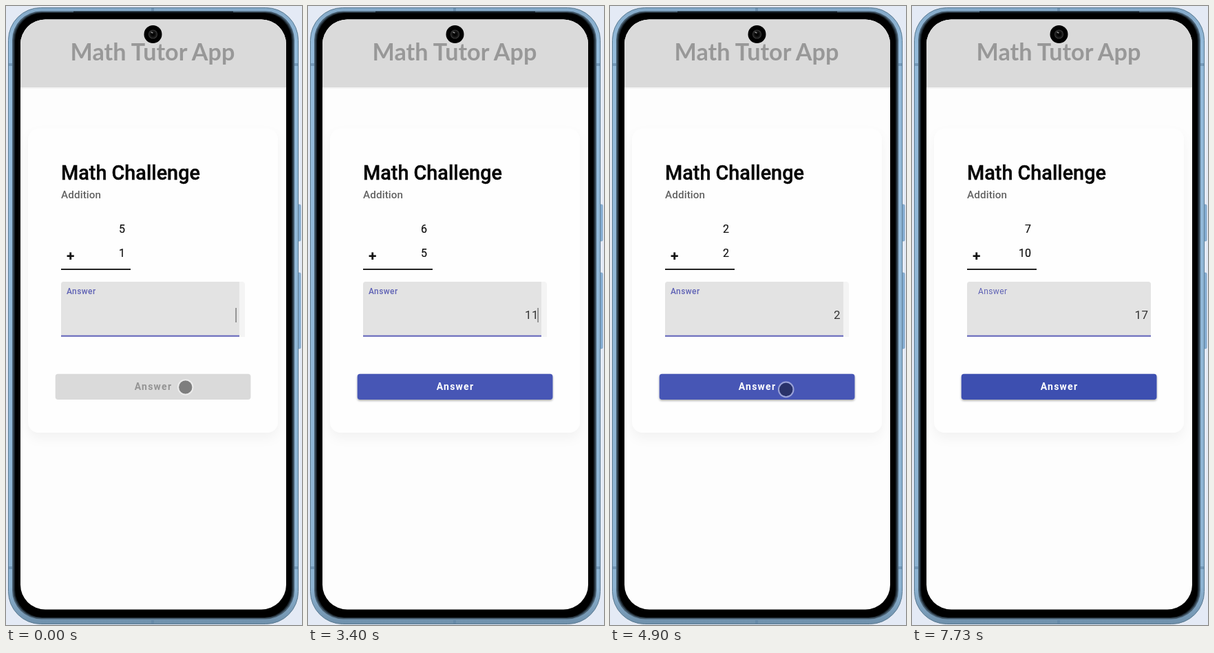
These frames come from a looping animation (430 px wide and 898 px high, 7870 ms). An HTML page:

```html
<!DOCTYPE html>
<html lang="en">
<head>
<meta charset="utf-8">
<title>Math Tutor App</title>
<style>
  html, body { margin: 0; width: 100%; height: 100%; overflow: hidden; background: #e4eaf5; }
  svg { display: block; width: 430px; height: 898px; }
  text { font-family: Roboto, sans-serif; white-space: pre; }
  .title { font: 700 34.2px Lato, sans-serif; fill: #989898; }
  .heading { font-size: 28.8px; font-weight: 500; fill: #050505; stroke: #050505; stroke-width: .4px; }
  .kind { font-size: 15.2px; font-weight: 500; letter-spacing: .12px; fill: #626262; }
  .digit { font-size: 16px; fill: #111; stroke: #111; stroke-width: .2px; }
  .plus { font-size: 21px; font-weight: 700; fill: #111; }
  .value { font-size: 17px; letter-spacing: .4px; fill: #333; }
  .label { font-weight: 500; letter-spacing: .4px; }
  .button { font-size: 14px; font-weight: 700; letter-spacing: 1.25px; }
  .message { font-size: 15.2px; font-weight: 500; letter-spacing: .45px; }
</style>
</head>
<body>
<svg viewBox="0 0 430 898">
  <defs>
    <linearGradient id="metal" x2="0" y2="1">
      <stop offset="0" stop-color="#84a9c8"/>
      <stop offset=".06" stop-color="#94bbdb"/>
      <stop offset=".94" stop-color="#8db3d2"/>
      <stop offset="1" stop-color="#6f90ab"/>
    </linearGradient>
    <filter id="cardShadow" x="-15%" y="-15%" width="130%" height="130%">
      <feDropShadow dx="0" dy="8" stdDeviation="8" flood-opacity=".045"/>
    </filter>
    <filter id="buttonShadow" x="-5%" y="-20%" width="110%" height="160%">
      <feDropShadow dx="0" dy="1.6" stdDeviation="1.6" flood-opacity=".35"/>
    </filter>
    <clipPath id="screen"><rect x="21" y="19.5" width="386" height="856" rx="36"/></clipPath>
    <clipPath id="alertClip"><rect id="alertShape" x="209.5" y="243" width="137.5" rx="10"/></clipPath>
  </defs>

  <rect width="430" height="898" fill="#e4eaf5"/>

  <g fill="#86afd4" stroke="#6f97bb" stroke-width=".7">
    <rect x="424" y="288" width="4" height="53" rx="1.5"/>
    <rect x="424" y="387" width="4" height="110" rx="1.5"/>
  </g>
  <rect x="3.5" y="2.5" width="421" height="894" rx="47" fill="url(#metal)" stroke="#58788f"/>
  <path d="M4 85h5M419 85h5M4 815h5M419 815h5M213 3v5M213 891v5" stroke="#5f84a4" stroke-width="4" opacity=".6"/>
  <rect x="9" y="7.5" width="410" height="882" rx="42" fill="#465b6c"/>
  <rect x="11" y="9" width="406" height="879" rx="41" fill="#1d2831"/>
  <rect x="13" y="10" width="402" height="877" rx="40"/>
  <path d="M98 9H330" stroke="#111a22" stroke-width="2.5"/>

  <g clip-path="url(#screen)">
    <rect x="21" y="19" width="386" height="857" fill="#fdfdfd"/>
    <rect x="21" y="118" width="386" height="2" fill="#f4f4f4"/>
    <rect x="21" y="19" width="386" height="99" fill="#dadada"/>
    <text class="title" x="213" y="79" text-anchor="middle">Math Tutor App</text>

    <rect id="card" x="32" y="178" width="363" rx="16" fill="#fefefe" filter="url(#cardShadow)"/>
    <text class="heading" id="headTop" x="80"></text>
    <text class="heading" id="headEnd" x="80" y="276">Challenge</text>
    <text class="kind" id="kind" x="80">Addition</text>

    <g id="alert">
      <g clip-path="url(#alertClip)">
        <rect id="alertFill" x="209" y="243" width="138" height="190"/>
        <rect id="alertEdge" x="209" y="243" width="6" height="190"/>
      </g>
      <circle id="alertDot" cx="247" r="10"/>
      <path id="alertMark" fill="none" stroke="#fff" stroke-width="2"/>
      <g id="alertText"></g>
    </g>

    <g id="body">
      <text class="digit" id="first" x="173" y="329" text-anchor="end"></text>
      <text class="digit" id="second" x="173" y="364" text-anchor="end"></text>
      <text class="plus" x="88" y="369">+</text>
      <rect x="80" y="381" width="101" height="2" fill="#222"/>

      <path d="M80 480V404q0-4 4-4H343q4 0 4 4V480z" fill="#f4f4f4"/>
      <path id="field" fill="#e3e3e3"/>
      <rect id="underline" x="80"/>
      <text class="label" id="label">Answer</text>
      <text class="value" id="value" y="453.5" text-anchor="end"></text>
      <rect id="caret" x="333.3" y="438" width="1.7" height="21" fill="#888"/>

      <rect id="button" x="71.7" y="533.7" width="283.8" height="37.3" rx="4"/>
      <text class="button" id="buttonText" x="214" y="557" text-anchor="middle">Answer</text>
    </g>

    <g id="pointer">
      <circle r="9.7" fill="#000" fill-opacity=".42"/>
      <circle r="10.8" fill="none" stroke="#fff" stroke-opacity=".45" stroke-width="2"/>
    </g>
  </g>

  <circle cx="213.5" cy="41" r="13"/>
  <circle cx="213.5" cy="41" r="6" fill="#161616" stroke="#383838" stroke-width="1.2"/>
  <circle cx="213.5" cy="41" r="3" fill="#050505"/>
  <path d="M211 38l2 1" stroke="#888" stroke-width="1.6" stroke-linecap="round"/>
</svg>

<script>
const LOOP = 7870, STEP = 100, LINE = 22.8;

const alerts = {
  good: {
    lines: ['Good', 'work,', 'that is', 'the right', 'answer.'],
    fill: '#e6f6ea', edge: '#43b05c', ink: '#21803a', shift: 106.4,
    mark: y => `M242.5 ${y}l3.2 3.4 6-6.6`
  },
  bad: {
    lines: ['Sorry,', 'that is', 'not', 'correct.', 'Please', 'try', 'again.'],
    fill: '#fde8e8', edge: '#ee4f50', ink: '#bf2636', shift: 152,
    mark: y => `M247 ${y - 5}v6M247 ${y + 3}v2`
  }
};

// Each entry overrides the state from its time on.
const script = [
  [0, { a: 5, b: 1, value: '', alert: null, fresh: false, focus: true }],
  [1100, { value: '6' }],
  [1600, { alert: 'good' }],
  [1800, { a: 6, b: 5, value: '', alert: null }],
  [3400, { value: '11' }],
  [3600, { alert: 'good' }],
  [3900, { a: 2, b: 2, value: '', alert: null }],
  [4300, { value: '2' }],
  [5000, { alert: 'bad' }],
  [6300, { a: 7, b: 10, value: '', alert: null, fresh: true, focus: false }],
  [7000, { focus: true }],
  [7300, { value: '1' }],
  [7400, { value: '17' }]
];

const pointerPaths = [
  { from: -500, to: 300, x: [262, 260], y: [553, 553] },
  { from: 1100, to: 2400, x: [260, 255], y: [553, 553] },
  { from: 4500, to: 5600, x: [257, 253.5], y: [556, 557] }
];

const el = {};
document.querySelectorAll('[id]').forEach(n => el[n.id] = n);
const set = (node, attrs) => { for (const k in attrs) node.setAttribute(k, attrs[k]); };
const show = (node, on) => set(node, { visibility: on ? 'visible' : 'hidden' });
const mix = ([a, b], p) => a + (b - a) * p;

function stateAt(t) {
  const state = { since: 0 };
  for (const [time, change] of script) {
    if (time <= t) Object.assign(state, change, { since: time });
  }
  return state;
}

function drawAlert(name) {
  show(el.alert, name);
  if (!name) return;
  const { lines, fill, edge, ink, mark } = alerts[name];
  const height = lines.length * LINE + 30.4;
  const middle = 243 + height / 2;
  set(el.alertShape, { height });
  set(el.alertFill, { fill });
  set(el.alertEdge, { fill: edge });
  set(el.alertDot, { cy: middle, fill: ink });
  set(el.alertMark, { d: mark(middle) });
  set(el.alertText, { fill: ink });
  el.alertText.innerHTML = lines.map((line, i) =>
    `<text class="message" x="267" y="${274.8 + i * LINE}">${line}</text>`).join('');
}

function drawField({ value, fresh, focus, since }, t) {
  const right = fresh ? 347 : 339;
  const corner = fresh ? 'H343q4 0 4 4' : 'H339';
  set(el.field, { d: `M80 480V404q0-4 4-4${corner}V480z` });
  show(el.field, focus);
  set(el.underline, focus
    ? { y: 477.7, width: right - 80, height: 2, fill: '#6365bd' }
    : { y: 479, width: right - 80, height: 1, fill: '#929292' });
  set(el.label, {
    x: fresh ? 96 : 88,
    y: focus ? 418 : 446,
    fill: focus ? '#6063b5' : '#707070',
    'font-size': focus ? 12 : 16
  });
  el.label.style.fontWeight = fresh ? 400 : 500;
  el.value.textContent = value;
  set(el.value, { x: fresh ? 343.5 : 335 });
  show(el.caret, !fresh && (t - since) % 1000 < 500);
}

function drawButton(enabled, deep) {
  const fill = !enabled ? '#dadada' : deep ? '#3c4fb0' : '#4656b5';
  set(el.button, { fill, filter: enabled ? 'url(#buttonShadow)' : 'none' });
  set(el.buttonText, { fill: enabled ? '#fff' : '#949494' });
}

function drawPointer(t) {
  const path = pointerPaths.find(p => t >= p.from && t < p.to);
  show(el.pointer, path);
  if (!path) return;
  const p = (t - path.from) / (path.to - path.from);
  set(el.pointer, {
    transform: `translate(${mix(path.x, p)} ${mix(path.y, p)})`,
    opacity: Math.min(1, (t - path.from + STEP) / 200, (path.to - t) / 200)
  });
}

function draw(time) {
  const t = Math.floor((time % LOOP) / STEP) * STEP;
  const s = stateAt(t);
  const shift = s.alert ? alerts[s.alert].shift : 0;

  set(el.card, { height: 441 + shift });
  set(el.body, { transform: `translate(0 ${shift})` });
  el.headTop.textContent = s.alert ? 'Math' : 'Math Challenge';
  set(el.headTop, { y: s.alert ? 244 : 252 });
  show(el.headEnd, s.alert);
  set(el.kind, { y: s.alert ? 304 : 279 });
  el.first.textContent = s.a;
  el.second.textContent = s.b;

  drawAlert(s.alert);
  drawField(s, t);
  drawButton(s.value !== '', s.fresh || (t >= 1400 && t < 1800));
  drawPointer(t);
}

const start = performance.now();
function tick() {
  draw(performance.now() - start);
  requestAnimationFrame(tick);
}
tick();
</script>
</body>
</html>
```
